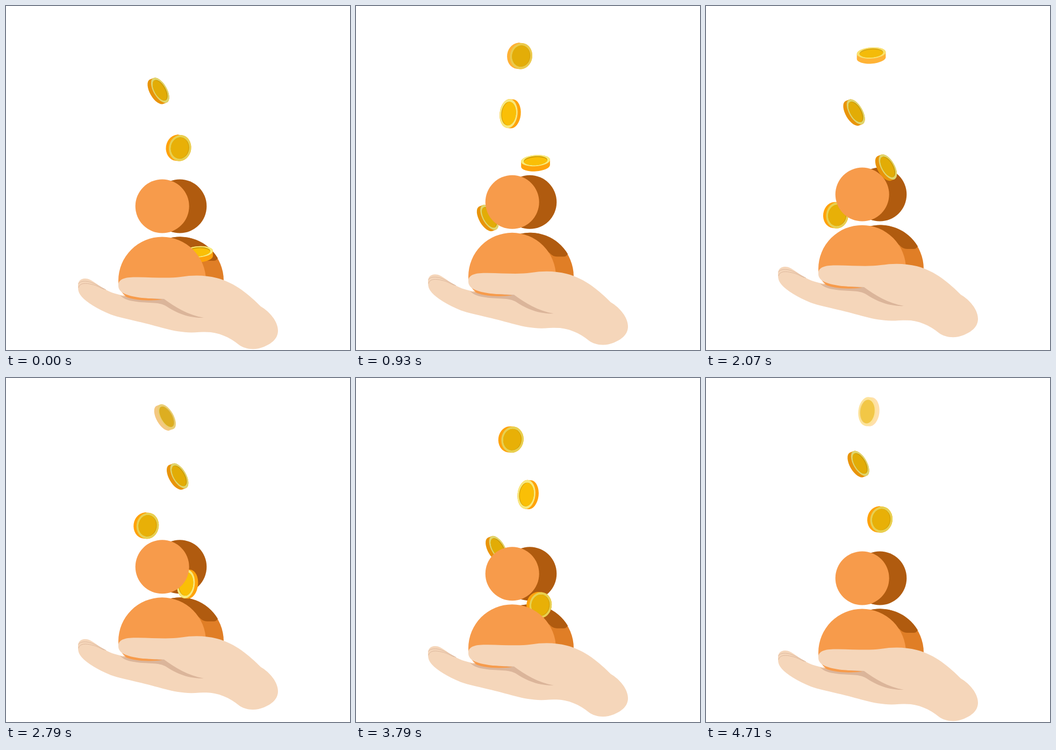
Write an HTML page with a canvas that moves like this. It is 640x640 px and loops after 4780 ms.

```html
<!DOCTYPE html>
<html lang="en">
<head>
<meta charset="utf-8">
<title>Coins rising from a hand</title>
<style>
  html, body { margin: 0; width: 100%; height: 100%; overflow: hidden; background: #fff; }
  canvas { display: block; width: 640px; height: 640px; }
</style>
</head>
<body>
<canvas id="stage" width="640" height="640"></canvas>
<script>
const ctx = document.getElementById('stage').getContext('2d');
const LOOP = 4780;
const STEP = LOOP / 67;
const SKIN = '#f5d6ba', CREASE = '#dbb59a';
const ORANGE = '#f79b4b', AMBER = '#e07e26', BROWN = '#b05b0f';

const backHand = new Path2D(`M134 520 C134 512 139 507 147 507 C160 507 170 521 192 531 C205 537 225 541 250 542
  L400 540 L400 609 C381 605 363 607 345 607.5 C310 607 282 595 245 587 C225 582 209 579 195 574
  C170 564 150 551 141 541 C134 533 134 527 134 520 Z`);
const fingerLines = new Path2D(`M134.5 517 C138 511 149 511 158 514 C169 518 176 523 186 528
  M135 524 C137 515 148 515 160 518 C170 520 176 525 183 527`);
const shadow = new Path2D(`M212 538 C230 546 270 543 294 545 C314 560 339 575 368 580
  C336 581 313 568 299 559 C284 549 262 554 236 549 C224 547 217 543 212 538 Z`);
const palm = new Path2D(`M209 520 C209 508 220 504 245 504.5 C275 505 305 507 325 504 C350 500 372 501 392 506
  C427 515 453 538 474 559 C491 569 506 587 506 604 C506 619 494 628 480 634 C463 641 445 639 433 630
  C416 616 396 607 370 606 L350 578 C330 571 310 556 298 549 C288 543 262 546 240 541 C219 537 209 531 209 520 Z`);
const backBody = new Path2D('M242 511 A81.5 81.5 0 0 1 405 511 V525 H242 Z');
const slot = new Path2D('M300 433 A81.5 81.5 0 0 1 394 469 Q392 474 386 474 H374 Q366 474 360 467 L300 440 Z');
const frontBody = new Path2D(`M209 511 A81.5 81.5 0 0 1 372 511 V530 L295 547 C270 547.5 250 548 236 546
  C222 543 209 530 209 511 Z`);

// off: from the face to the back of the coin
const KINDS = {
  A: { rx: 12.5, ry: 26, tilt: -30, off: [-6.5, 2.5], side: '#e9940a', rim: '#e0d56c', face: '#e2ac06', dark: '#c59405' },
  B: { rx: 20.7, ry: 24.3, tilt: 8, off: [-5.5, -.5], side: '#ffa20c', rim: '#e8d050', face: '#e8b007', dark: '#cf9a06' },
  C: { rx: 16.6, ry: 27, tilt: 6, off: [6, .5], side: '#ffa30b', rim: '#f8e87c', face: '#fabf06', dark: '#d09c06' },
  D: { rx: 27, ry: 10.3, tilt: -4, off: [0, 9.5], side: '#ffa30b', rim: '#f8ec7a', face: '#fabf06', dark: '#d09c06' }
};

// Waypoints: time, x, y
const TRACKS = [
  ['D', [0, 358, 462], [930, 334, 292], [1570, 319, 178], [2070, 307.5, 92], [2390, 301, 46]],
  ['A', [597, 236, 452], [930, 245, 394], [1570, 262.5, 282], [2070, 275.5, 198], [2790, 296, 72], [2960, 300, 52]],
  ['A', [1195, 354, 438], [1570, 345.5, 379], [2070, 335, 300.5], [2790, 319, 182], [3585, 301, 51]],
  ['B', [1793, 233.5, 434], [2070, 241.5, 389], [2790, 261, 273.5], [3790, 288.5, 113], [4183, 299, 49]],
  ['C', [2390, 344.5, 449], [2790, 337.5, 382], [3790, 320, 215.5], [4710, 303, 62.5], [LOOP, 302, 51]],
  ['A', [2988, 241, 452], [3790, 261.5, 317], [4710, 283.5, 160], [LOOP, 285, 148]],
  ['A', [0, 283.5, 158], [598, 298, 48]],
  ['B', [3585, 344, 456], [3790, 340.5, 421], [4710, 323.5, 263], [LOOP, 322, 251]],
  ['B', [0, 321, 264], [930, 304.5, 92.5], [1195, 299.5, 45]],
  ['C', [4183, 242, 455], [LOOP, 272, 367]],
  ['C', [0, 272, 367], [930, 287, 200], [1570, 297, 85], [1793, 300, 49]]
];

function fill(path, color) {
  ctx.fillStyle = color;
  ctx.fill(path);
}

function oval(x, y, rx, ry, tilt = 0) {
  const p = new Path2D();
  p.ellipse(x, y, rx, ry, tilt * Math.PI / 180, 0, Math.PI * 2);
  return p;
}

function drawCoin(kind, x, y) {
  const { rx, ry, tilt, off: [dx, dy], side, rim, face, dark } = KINDS[kind];
  const fx = x - dx / 2, fy = y - dy / 2;
  const sweep = new Path2D();
  for (let k = 0; k <= 10; k++) sweep.addPath(oval(fx + dx * k / 10, fy + dy * k / 10, rx, ry, tilt));
  const inner = oval(fx, fy, rx * .82, ry * .82, tilt);
  fill(sweep, side);
  fill(oval(fx, fy, rx, ry, tilt), rim);
  fill(inner, dark);
  ctx.save();
  ctx.clip(inner);
  fill(oval(fx + dx * .2, fy + dy * .2, rx * .82, ry * .82, tilt), face);
  ctx.restore();
}

function drawTrack([kind, ...pts], t) {
  const i = pts.findIndex((p, n) => n && t >= pts[n - 1][0] && t < p[0]);
  if (i < 0) return;
  const [t0, x0, y0] = pts[i - 1], [t1, x1, y1] = pts[i];
  const k = (t - t0) / (t1 - t0);
  const y = y0 + (y1 - y0) * k;
  ctx.globalAlpha = Math.max(0, Math.min(1, (y - 42) / 61));
  drawCoin(kind, x0 + (x1 - x0) * k, y);
  ctx.globalAlpha = 1;
}

function withBob(dy, draw) {
  ctx.save();
  ctx.translate(0, dy);
  draw();
  ctx.restore();
}

function render(t) {
  const bob = -11.4 * (1 - Math.cos((t + 15) / LOOP * Math.PI * 2));
  ctx.clearRect(0, 0, 640, 640);
  withBob(bob, () => {
    fill(backHand, SKIN);
    ctx.strokeStyle = CREASE;
    ctx.lineWidth = .9;
    ctx.stroke(fingerLines);
    fill(backBody, AMBER);
    fill(slot, BROWN);
    fill(oval(323.3, 372.5, 50, 50), BROWN);
  });
  TRACKS.forEach(track => drawTrack(track, t));
  withBob(bob, () => {
    fill(oval(290.7, 372.5, 50, 50), ORANGE);
    fill(frontBody, ORANGE);
    fill(palm, SKIN);
    fill(shadow, CREASE);
    // Strip of the body left visible under the thumb
    fill(new Path2D('M217 538 C235 544 265 543 291 546 C270 549 235 549 217 538 Z'), ORANGE);
  });
}

function tick() {
  const t = performance.now() % LOOP;
  render(Math.floor(t / STEP) * STEP);
  requestAnimationFrame(tick);
}
tick();
</script>
</body>
</html>
```
